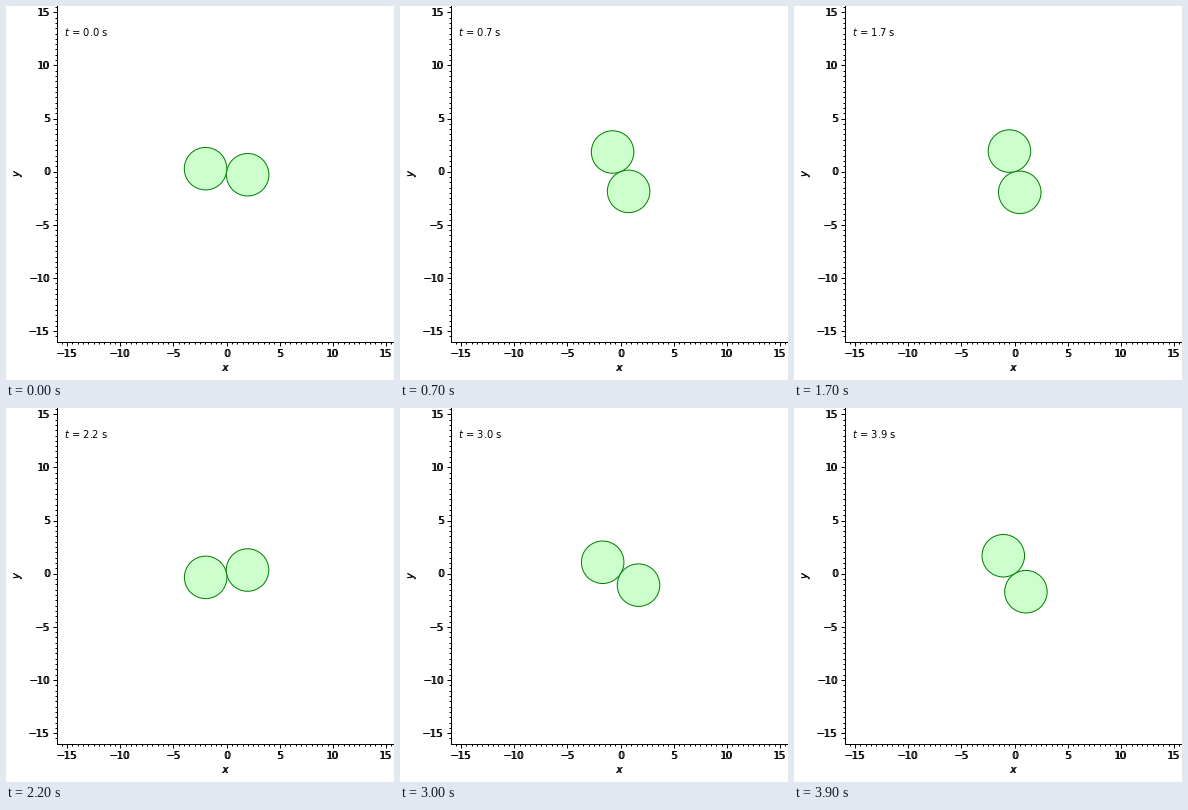
Write a matplotlib script that moves like this. It is 388 by 374 pixels and loops after 4 s.

```python
import math

import matplotlib.pyplot as plt
from matplotlib.animation import FuncAnimation
from matplotlib.patches import Circle

W, H, DPI = 388, 374, 64
PX = 72 / DPI            # points per pixel
SCALE = 10.63            # pixels per unit
OX, OY = 220.6, 165.7    # pixel position of the origin
LEFT, BOTTOM = 51, 336   # pixel position of the axis lines
FRAMES, STEP = 40, 100
RADIUS, SPEED, PHASE = 2, 3.0, -0.143

plt.rcParams["font.family"] = "DejaVu Sans"
plt.rcParams["mathtext.fontset"] = "dejavusans"

fig = plt.figure(figsize=(W / DPI, H / DPI), dpi=DPI, facecolor="white")
ax = fig.add_axes([LEFT / W, 1 - BOTTOM / H, 1 - LEFT / W, BOTTOM / H])
ax.set_xlim((LEFT - OX) / SCALE, (W - OX) / SCALE)
ax.set_ylim((OY - BOTTOM) / SCALE, OY / SCALE)
ax.spines[["top", "right"]].set_visible(False)
ax.spines[["left", "bottom"]].set_linewidth(PX)

majors = range(-15, 16, 5)
minors = [n / 2 for n in range(-31, 32)]
for axis in (ax.xaxis, ax.yaxis):
    axis.set_ticks(majors, labels=[""] * len(majors))
    axis.set_ticks([m for m in minors if m % 5], minor=True)
ax.tick_params(which="major", length=4 * PX, width=PX)
ax.tick_params(which="minor", length=2 * PX, width=PX)


def label(x, y, text, **style):
    """Text with its baseline at a pixel position."""
    style = {"ha": "center", "va": "baseline", "fontsize": 10 * PX, **style}
    return fig.text(x / W, 1 - y / H, text, **style)


def heavy(x, y, text, **style):
    """Text struck twice, one pixel apart."""
    for dx in (-0.5, 0.5):
        label(x + dx, y, text, **style)


for n in majors:
    name = str(n).replace("-", "\u2212")
    heavy(OX + n * SCALE, 351, name)
    heavy(44, OY - n * SCALE + 3.7, name, ha="right")
heavy(220, 365, "$x$")
heavy(12.5, 167, "$y$", va="center", rotation=90)
clock = label(58.5, 30, "", ha="left")

discs = [
    ax.add_patch(Circle((0, 0), RADIUS, facecolor="#ccffcc", edgecolor="green",
                        linewidth=PX))
    for _ in range(2)
]


def update(i):
    t = i * STEP / 1000
    angle = SPEED * t + PHASE
    x, y = RADIUS * math.cos(angle), RADIUS * math.sin(angle)
    discs[0].center = x, y
    discs[1].center = -x, -y
    clock.set_text(f"$t$ = {t:.1f} s")
    return [*discs, clock]


anim = FuncAnimation(fig, update, frames=FRAMES, interval=STEP,
                     repeat=True, repeat_delay=0)
plt.show()
```
